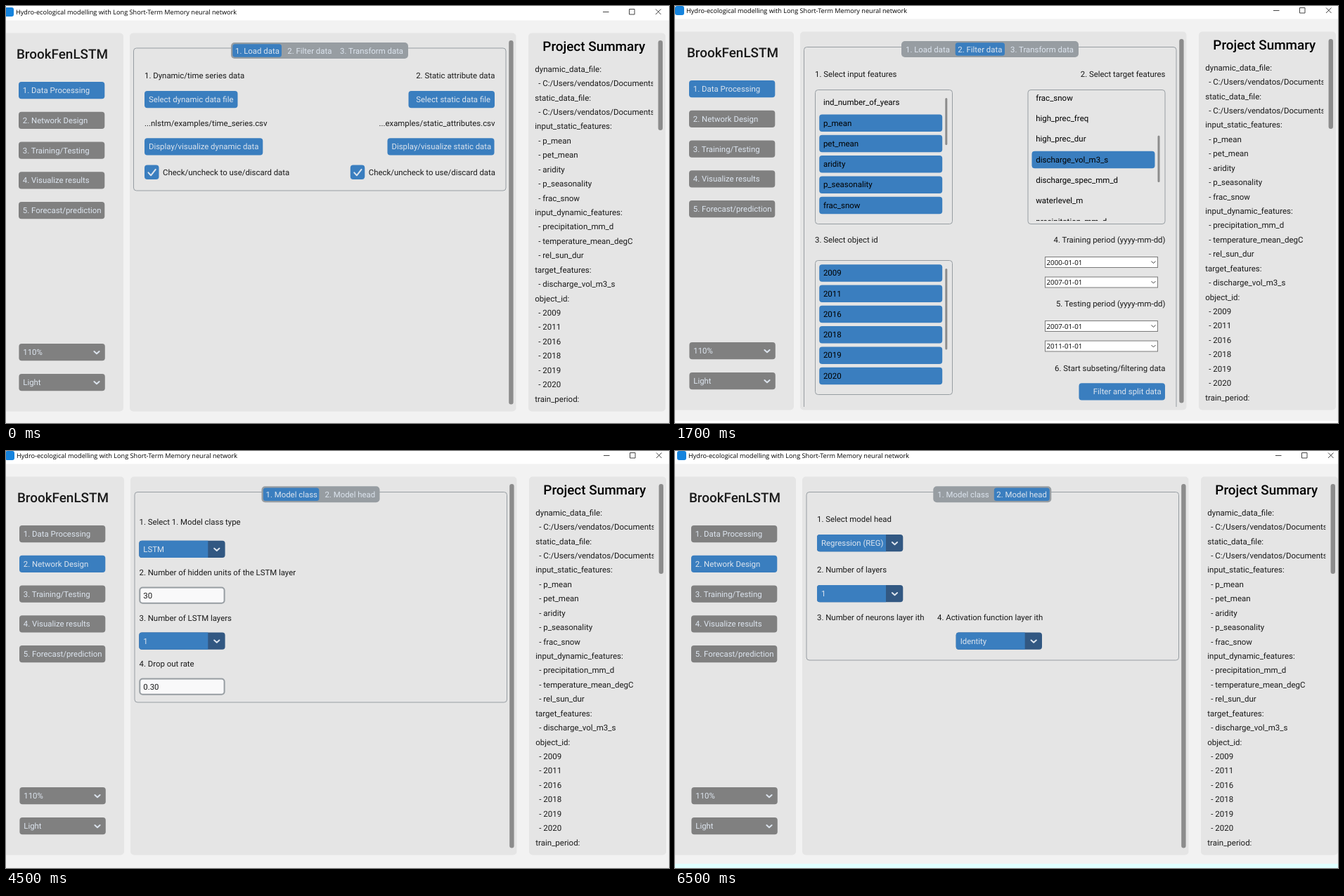
Animation of 943 by 594 pixels, one loop 8000 ms. Source, as an HTML page:

```html
<!DOCTYPE html>
<html lang="en">
<head>
<meta charset="utf-8">
<title>Model setup walkthrough</title>
<style>
  html, body { margin: 0; width: 100%; height: 100%; overflow: hidden; background: #f2f2f2; }
  svg { display: block; width: 943px; height: 594px; }
  text { font: 11.4px Roboto, Arial, sans-serif; fill: #1a1a1a; white-space: pre; text-rendering: geometricPrecision; }
  .head { font-size: 18.9px; font-weight: 500; }
  .dark { fill: #000; }
  .wide { font-size: 11.5px; }
  .lite { fill: #dce4ee; }
  .sys { font: 9.15px "Open Sans", "Noto Sans", sans-serif; fill: #000; }
  .date { font-size: 9.75px; }
  .line { fill: none; stroke: #979da2; }
  .chev { fill: none; stroke: #dce4ee; stroke-width: 2; stroke-linecap: round; stroke-linejoin: round; }
  .thin { fill: none; stroke: #444; stroke-width: 1; }
  /* Scenes are opaque and stacked; each one appears at its start time. */
  .scene { animation: 8s step-end infinite; }
  #load { animation: none; }
  #filter { animation-name: filter; }
  #transform { animation-name: transform; }
  #model { animation-name: model; }
  #output { animation-name: output; }
  @keyframes filter { 0% { opacity: 0 } 6.25%, 100% { opacity: 1 } }
  @keyframes transform { 0% { opacity: 0 } 31.25%, 100% { opacity: 1 } }
  @keyframes model { 0% { opacity: 0 } 56.25%, 100% { opacity: 1 } }
  @keyframes output { 0% { opacity: 0 } 81.25%, 100% { opacity: 1 } }
</style>
</head>
<body>
<svg id="stage" viewBox="0 0 943 594" xmlns="http://www.w3.org/2000/svg"></svg>
<script>
const BLUE = '#3a7ebf', NAVY = '#325882', GREY = '#808080', TAB = '#979da2', PANEL = '#e5e5e5', BAR = '#8c8c8c';

const rect = (x, y, w, h, fill, r = 0, extra = '') =>
  `<rect x="${x}" y="${y}" width="${w}" height="${h}" rx="${r}" fill="${fill}" ${extra}/>`;
const path = (d, cls) => `<path d="${d}" class="${cls}"/>`;

// y is the middle of the capitals
const text = (s, x, y, cls = '', anchor = 'start', drop = 4) =>
  `<text x="${x}" y="${y + drop}" class="${cls}" text-anchor="${anchor}">${s}</text>`;
const right = (s, x, y) => text(s, x, y, '', 'end');
const labels = (x, rows) => rows.map(([s, y]) => text(s, x, y)).join('');

const outline = (x, y, w, h, extra = '') =>
  `<rect x="${x}" y="${y}" width="${w}" height="${h}" rx="4" class="line" ${extra}/>`;
const chevron = (x, y) => path(`M${x - 3.6} ${y - 1.5}l3.6 3.2l3.6-3.2`, 'chev');

const button = (s, x, w, y, tx = x + 6, fill = BLUE) =>
  rect(x, y - 12, w, 24.3, fill, 4) + text(s, tx, y, 'lite');
const centred = (s, x, y) =>
  rect(x, y - 12, 122.3, 24.3, BLUE, 4) + text(s, x + 61, y, 'lite', 'middle');
const option = (s, x, y) =>
  rect(x, y - 12, 122.3, 24.3, NAVY, 4) +
  `<path d="M${x + 98} ${y - 12}h-94q-4 0-4 4v16.3q0 4 4 4h94z" fill="${BLUE}"/>` +
  text(s, x + 6, y, 'lite') + chevron(x + 110.5, y + .5);
const entry = (s, x, y) =>
  rect(x + 1, y - 11, 120.3, 22.3, '#f9f9fa', 4, `stroke="${TAB}" stroke-width="2"`) + text(s, x + 6, y);
const check = (x, y) =>
  rect(x, y, 20.5, 20.5, BLUE, 4) + path(`M${x + 5.5} ${y + 10.8}l3.6 4l6.6-8.4`, 'chev') +
  text('Check/uncheck to use/discard data', x + 26, y + 10.5);
const dateBox = (s, y) =>
  rect(526.5, y - 7.5, 160, 15, '#fff', 0, 'stroke="#7a7a7a"') +
  text(s, 528.5, y, 'sys date', 'start', 3.5) + path(`M677.5 ${y - 1.5}l3 3l3-3`, 'thin');
const row = (s, x, y, on) =>
  (on ? rect(x, y - 12, 175, 24.5, BLUE, 4) : '') + text(s, x + 5.7, y, 'dark wide');
const rows = (list, x, y, on) => list.map((s, i) => row(s, x, y + i * 29.3, on(i))).join('');

// cells: [caption, text x, left, width]
const tabs = (x, w, y, cells, active) =>
  rect(x, y, w, 23, TAB, 5) +
  cells.map(([s, tx, l, cw], i) =>
    (i === active ? rect(l, y + 2.2, cw, 18.6, BLUE, 3.5) : '') + text(s, tx, y + 11.5, 'lite')).join('');
const dataTabs = (dx, dy, active) => tabs(320 + dx, 252, 52 + dy, [
  ['1. Load data', 326 + dx, 322.3 + dx, 69.7],
  ['2. Filter data', 400.3 + dx, 396.7 + dx, 70.3],
  ['3. Transform data', 475 + dx, 471 + dx, 98.5]], active);
const modelTabs = (x, active) => tabs(x, 168, 50.3, [
  ['1. Model class', x + 6, x + 2.3, 79.5],
  ['2. Model head', x + 90, x + 86.5, 79]], active);

const steps = ['1. Data Processing', '2. Network Design', '3. Training/Testing', '4. Visualize results', '5. Forecast/prediction'];
const summary = ['dynamic_data_file:', '- C:/Users/vendatos/Documents', 'static_data_file:', '- C:/Users/vendatos/Documents',
  'input_static_features:', '- p_mean', '- pet_mean', '- aridity', '- p_seasonality', '- frac_snow',
  'input_dynamic_features:', '- precipitation_mm_d', '- temperature_mean_degC', '- rel_sun_dur',
  'target_features:', '- discharge_vol_m3_s', 'object_id:',
  '- 2009', '- 2011', '- 2016', '- 2018', '- 2019', '- 2020', 'train_period:'];

const setting = (s, y) =>
  rect(18.4, y - 12, 122.4, 24.3, GREY, 4) + text(s, 24.3, y, 'lite') + chevron(129, y + .5);

function chrome(dx, dy, step) {
  const side = steps.map((s, i) => button(s, 18, 122.3, 120 + i * 42.75, 23.8, i === step ? BLUE : GREY)).join('');
  const lines = summary.map((s, i) =>
    text(s, s[0] === '-' ? 757.3 : 752.3, 89.7 + i * 20.43, 'wide')).join('');
  return `<g transform="translate(${dx} ${dy})">` +
    rect(-10, -10, 970, 30.5, '#fff') +
    rect(-2, 2, 13, 13, '#1583dd', 3) +
    text('Hydro-ecological modelling with Long Short-Term Memory neural network', 14, 9, 'sys', 'start', 3) +
    path('M849 8.5h8.5M886.5 4.5h7.5v7.5h-7.5zM924 4.5l7.5 7.5m0-7.5l-7.5 7.5', 'thin') +
    rect(-20, 38.5, 187, 539, PANEL, 5) + rect(176, 38.5, 549.5, 539, PANEL, 5) + rect(743, 38.5, 195, 539, PANEL, 5) +
    text('BrookFenLSTM', 80, 68.5, 'head', 'middle', 6.7) +
    side + setting('110%', 493) + setting('Light', 536) +
    rect(715.2, 49, 6.4, 518.5, BAR, 3.2) + rect(927.6, 49, 6.4, 128, BAR, 3.2) +
    text('Project Summary', 836.3, 57.3, 'head dark', 'middle', 6.7) +
    `<g clip-path="url(#side)">${lines}</g></g>`;
}

const scene = (id, dx, dy, step, body, strip = '') =>
  `<g class="scene" id="${id}">` + rect(0, 0, 943, 594, '#f2f2f2') + strip + chrome(dx, dy, step) + body + '</g>';

const load = outline(181.5, 60, 529.5, 203) + dataTabs(0, 0, 0) +
  text('1. Dynamic/time series data', 197, 99) + right('2. Static attribute data', 695.5, 99) +
  button('Select dynamic data file', 197, 132.5, 133) + button('Select static data file', 572.5, 122.5, 133, 583.3) +
  text('...nlstm/examples/time_series.csv', 197, 166.7) + right('...examples/static_attributes.csv', 695.5, 166.7) +
  button('Display/visualize dynamic data', 197, 168.3, 200.3) + button('Display/visualize static data', 542.5, 152, 200.3) +
  check(197, 226.5) + check(489.8, 226.5);

const filter = `<g clip-path="url(#view)">${outline(183.5, 58.5, 529.5, 540)}</g>` + dataTabs(2, -2, 1) +
  text('1. Select input features', 199, 97) + right('2. Select target features', 697.5, 97) +
  outline(199.5, 119.5, 195, 191) + outline(502, 119.5, 195, 191) + outline(199.5, 362.5, 195, 191) +
  rows(['ind_number_of_years', 'p_mean', 'pet_mean', 'aridity', 'p_seasonality', 'frac_snow'], 205.2, 137.2, i => i > 0) +
  `<g clip-path="url(#list)">` +
  rows(['frac_snow', 'high_prec_freq', 'high_prec_dur', 'discharge_vol_m3_s', 'discharge_spec_mm_d', 'waterlevel_m', 'precipitation_mm_d'],
    507.5, 130.8, i => i === 3) + '</g>' +
  rows(['2009', '2011', '2016', '2018', '2019', '2020'], 205.2, 380.2, () => true) +
  rect(384.3, 131, 3, 67, BAR, 1.5) + rect(686.5, 184.5, 3, 66.5, BAR, 1.5) + rect(384.3, 374, 3, 115.5, BAR, 1.5) +
  text('3. Select object id', 199, 333) + right('4. Training period (yyyy-mm-dd)', 697.5, 333) +
  dateBox('2000-01-01', 365) + dateBox('2007-01-01', 393.5) +
  right('5. Testing period (yyyy-mm-dd)', 697.5, 424.3) +
  dateBox('2007-01-01', 456) + dateBox('2011-01-01', 484.5) +
  right('6. Start subseting/filtering data', 697.5, 515.7) +
  button('Filter and split data', 574.5, 122.5, 549.3, 594.8);

const transform = outline(185.5, 58.5, 529.5, 355.5) + dataTabs(4, -2, 2) +
  labels(201, [['1. Transformer for dynamic features', 95], ['2. Transformer for static features', 155],
    ['3. Transformer for target features', 215], ['4. Execute data transformation', 303], ['5. Display/Visualize transform data', 363]]) +
  [125, 185, 245].map(y => option('MinMaxScaler', 200.8, y)).join('') +
  centred('Execute', 200.8, 333) + centred('Display/Visualize', 200.8, 393);

const model = outline(183, 58.5, 529.5, 299.5) + modelTabs(363.5, 0) +
  labels(189.5, [['1. Select 1. Model class type', 101.3], ['2. Number of hidden units of the LSTM layer', 173],
    ['3. Number of LSTM layers', 238], ['4. Drop out rate', 303]]) +
  option('LSTM', 189.3, 139.7) + entry('30', 189.3, 205.5) + option('1', 189.3, 270.5) + entry('0.30', 189.3, 335.5);

const output = outline(187, 58.5, 529.5, 239.5) + modelTabs(367.3, 1) +
  labels(202, [['1. Select model head', 97], ['2. Number of layers', 169], ['3. Number of neurons layer ith', 237]]) +
  text('4. Activation function layer ith', 373, 237) +
  option('Regression (REG)', 202, 131) + option('1', 202, 203) + option('Identity', 399.7, 270.5);

const clip = (id, x, y, w, h) => `<clipPath id="${id}">${rect(x, y, w, h, '#000')}</clipPath>`;

document.getElementById('stage').innerHTML =
  '<defs>' + clip('side', 745, 75, 175.3, 495) + clip('view', 178, 50, 545, 521) + clip('list', 503, 121, 193, 185) + '</defs>' +
  scene('load', 0, 0, 0, load) +
  scene('filter', 2, -2, 0, filter, rect(0, 591, 943, 3, '#fff')) +
  scene('transform', 4, -2, 0, transform, rect(0, 589, 943, 5, '#000')) +
  scene('model', 1, -2, 1, model) +
  scene('output', 5, -2, 1, output, rect(0, 588, 943, 6, '#e0ffff'));
</script>
</body>
</html>
```
